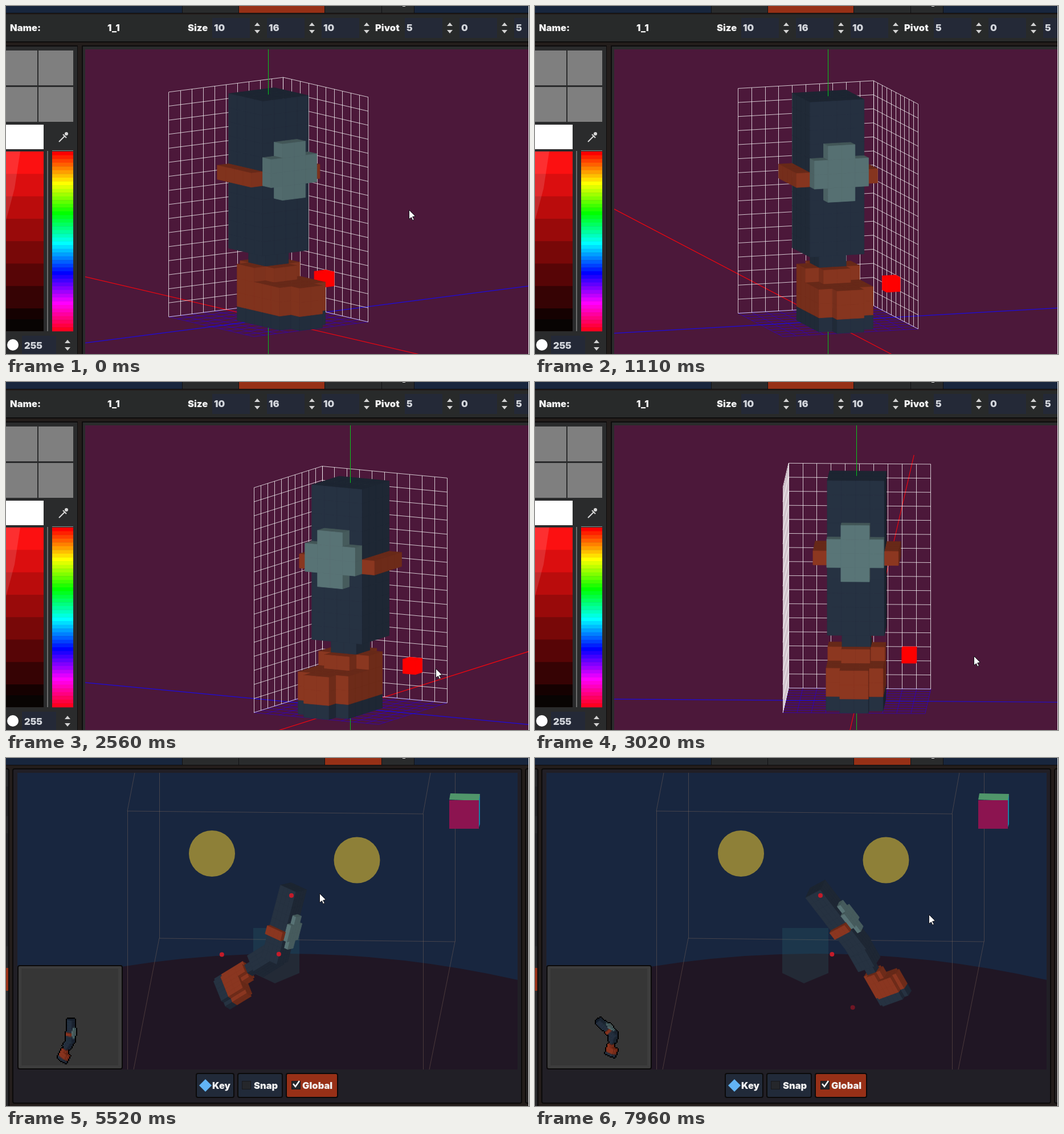
Recreate the animation shown at these times as an HTML page with a canvas. Size 918 by 610 pixels, loop 7990 ms.

```html
<!DOCTYPE html>
<html lang="en">
<head>
<meta charset="utf-8">
<title>Voxel leg</title>
<style>
  html, body { margin: 0; width: 100%; height: 100%; overflow: hidden; background: #211d1c; }
  canvas { display: block; width: 918px; height: 610px; }
</style>
</head>
<body>
<canvas id="stage" width="918" height="610"></canvas>
<script>
const LOOP = 7990, ANIMATE_TAB = 4760;
const g = document.getElementById('stage').getContext('2d');
const clamp = (v, low, high) => Math.min(high, Math.max(low, v));
const rad = degrees => degrees * Math.PI / 180;

// ---------- drawing helpers ----------
function rect(x, y, w, h, color) {
  g.fillStyle = color;
  g.fillRect(x, y, w, h);
}
function poly(c, points, color, edge) {
  c.beginPath();
  points.forEach(([x, y]) => c.lineTo(x, y));
  c.closePath();
  c.fillStyle = color;
  c.fill();
  if (edge) {
    c.strokeStyle = color;
    c.lineWidth = edge;
    c.stroke();
  }
}
// Vertical lines snap to whole pixels
function line([ax, ay], [bx, by]) {
  if (Math.abs(ax - bx) < 0.01) ax = bx = Math.floor(ax) + 0.5;
  g.moveTo(ax, ay);
  g.lineTo(bx, by);
}
function strokeLines(color, draw, width = 1) {
  g.beginPath();
  draw();
  g.strokeStyle = color;
  g.lineWidth = width;
  g.stroke();
}
function clipped(x, y, w, h, draw) {
  g.save();
  g.beginPath();
  g.rect(x, y, w, h);
  g.clip();
  draw();
  g.restore();
}
function disc(x, y, r, color) {
  g.beginPath();
  g.arc(x, y, r, 0, 7);
  g.fillStyle = color;
  g.fill();
}
function label(text, x, y, color = '#f2f2f2') {
  g.font = '900 16.5px Inter, sans-serif';
  g.fillStyle = color;
  g.fillText(text, x, y);
}
function panel(x, y, w, h, color) {
  g.beginPath();
  g.roundRect(x, y, w, h, 3);
  g.fillStyle = color;
  g.fill();
  g.strokeStyle = '#0b0a0a';
  g.lineWidth = 2;
  g.stroke();
}

// ---------- motion ----------
// Each move is [from ms, to ms, ...end values]; values rest between moves
function follow(t, start, moves) {
  return moves.reduce((now, [from, to, ...end]) => {
    const k = clamp((t - from) / (to - from), 0, 1);
    return now.map((v, i) => v + (end[i] - v) * k);
  }, start);
}
const yawAt = t => follow(t, [36.6],
  [[370, 1340, 12.6], [1550, 2300, -43.7], [2300, 3020, -2.3]])[0];
const pointerAt = t => follow(t, [707, 357], [
  [40, 1550, 752, 488], [1930, 2560, 754, 502], [2560, 3020, 770, 480],
  [3260, 3450, 834, 330], [3450, 3700, 638, 101], [3940, 4270, 601, 7],
  [5130, 5520, 550, 237], [6680, 7260, 671, 266], [7850, 7960, 691, 274]
]);
function brushCell(t) {
  if (t < 2300) return { x: 9, h: 2, z: 4 };
  const row = Math.floor((538 - pointerAt(t)[1]) / 24.6);
  return { x: t < 3020 ? 7 : 8, h: clamp(row, 2, 15), z: 9 };
}

// ---------- voxel model ----------
const NAVY = [38, 50, 66], ORANGE = [139, 55, 32], TEAL = [89, 116, 118], RED = [255, 0, 0];
const voxels = new Map();
const key = (x, h, z) => `${x},${h},${z}`;
function block([x0, x1], [h0, h1], [z0, z1], color) {
  for (let x = x0; x < x1; x++)
    for (let h = h0; h < h1; h++)
      for (let z = z0; z < z1; z++) voxels.set(key(x, h, z), { x, h, z, color });
}
const WIDE = [3, 7], SLIM = [4, 6];
block([2, 8], [10, 11], WIDE, ORANGE);
block(WIDE, [5, 16], WIDE, NAVY);
block(SLIM, [4, 5], SLIM, NAVY);
block(WIDE, [3, 4], SLIM, ORANGE);
block(SLIM, [3, 4], WIDE, ORANGE);
for (const [rows, color] of [[[0, 1], NAVY], [[1, 3], ORANGE]]) {
  block(WIDE, rows, [1, 6], color);
  block(SLIM, rows, [0, 7], color);
}
block(WIDE, [10, 12], [2, 3], TEAL);
block(SLIM, [9, 13], [2, 3], TEAL);

// Parallel projection with the model corner at (left, base)
function camera(yaw, tilt, unit, tall, left = 0, base = 0) {
  const c = Math.cos(yaw), s = Math.sin(yaw);
  const depth = (x, z) => x * s + z * c;
  return {
    c, s,
    at: (x, h, z) => [left + unit * (x * c - z * s), base - unit * tilt * depth(x, z) - tall * h],
    far: v => depth(v.x, v.z) - v.h * tilt
  };
}
const shade = (right, near) => 0.68 + 0.34 * Math.max(0, -0.18 * right + 0.95 * near);

function drawVoxels(ctx, cells, { at, far, c, s }) {
  const dir = s > 0 ? -1 : 1;
  const faces = [
    { n: [0, 1, 0], u: [1, 0, 0], v: [0, 0, 1], light: 0.74 },
    { n: [dir, 0, 0], u: [0, 1, 0], v: [0, 0, 1], light: shade(dir * c, -dir * s) },
    { n: [0, 0, -1], u: [1, 0, 0], v: [0, 1, 0], light: shade(s, c) }
  ];
  for (const cell of [...cells.values()].sort((a, b) => far(b) - far(a))) {
    const p = [cell.x, cell.h, cell.z], flat = cell.color === RED;
    for (const { n, u, v, light } of faces) {
      if (cells.has(key(...p.map((q, i) => q + n[i])))) continue;
      const o = p.map((q, i) => q + Math.max(0, n[i]));
      const corner = (a, b) => at(...o.map((q, i) => q + a * u[i] + b * v[i]));
      const rgb = cell.color.map(q => Math.round(q * (flat ? 1 : light)));
      poly(ctx, [corner(0, 0), corner(1, 0), corner(1, 1), corner(0, 1)], `rgb(${rgb})`, 0.8);
    }
  }
}

function drawModelView(t) {
  const view = camera(rad(yawAt(t)), 0.1725, 25, 24.63, 435, 579.5), { at } = view;
  rect(139, 76, 778, 534, '#4c183a');

  strokeLines('rgba(48,0,195,.75)', () => {
    for (let i = 0; i <= 10; i++) {
      line(at(i, 0, 0), at(i, 0, 10));
      line(at(0, 0, i), at(10, 0, i));
    }
  });
  strokeLines('#ee060f', () => line(at(5, 0, -95), at(5, 0, 105)), 1.2);
  strokeLines('#1c0ae0', () => line(at(-95, 0, 5), at(105, 0, 5)), 1.2);
  strokeLines('#06c01c', () => line(at(5, 0, 5), at(5, -50, 5)));

  const side = view.s > 0 ? 10 : 0;
  strokeLines('rgba(255,255,255,.75)', () => {
    for (let i = 0; i <= 10; i++) {
      line(at(i, 0, 10), at(i, 16, 10));
      line(at(side, 0, i), at(side, 16, i));
    }
    for (let h = 0; h <= 16; h++) {
      line(at(0, h, 10), at(10, h, 10));
      line(at(side, h, 0), at(side, h, 10));
    }
  });

  const brush = { ...brushCell(t), color: RED };
  drawVoxels(g, new Map(voxels).set(key(brush.x, brush.h, brush.z), brush), view);
  strokeLines('#06c81c', () => line(at(5, 16, 5), at(5, 60, 5)));
}

// ---------- interface ----------
function drawTabs(active) {
  const edges = [310, 409, 560, 660, 717];
  rect(0, 0, 918, 610, '#231d1b');
  rect(0, 0, 918, 12, '#18263d');
  for (let i = 0; i < 4; i++) {
    rect(edges[i] - 1, 0, edges[i + 1] - edges[i] + 1, 12, '#111214');
    rect(edges[i], 0, edges[i + 1] - edges[i] - 1, 12, i === active ? '#963016' : '#292b2c');
  }
  rect(696, 0, 5, 1, '#d8d8d8');
  rect(0, 12, 918, 1, '#0d0c0c');
}
function spinner(x, y) {
  for (const up of [-1, 1]) {
    const base = y + 0.5 + up * 3.5;
    poly(g, [[x - 5, base], [x, base + up * 6], [x + 5, base]], '#d2d2d2');
  }
}
function fields(x, values) {
  values.forEach((value, i) => {
    const left = x + i * 96;
    rect(left, 21, 66, 35, '#242937');
    label(value, left + 3, 44, '#d3d6dc');
    spinner(left + 79, 38);
  });
}
function drawModelPanels() {
  drawTabs(1);
  rect(0, 15, 918, 47, '#282a2a');
  rect(0, 62, 918, 2, '#0d0c0c');
  for (const [x, w] of [[-2, 128], [133, 790]]) {
    rect(x, 69, w, 541, '#0d0c0c');
    rect(x + 2, 71, w - 3, 539, '#2a2b2c');
  }
  label('Name:', 7, 44);
  label('1_1', 178, 44);
  label('Size', 319, 44);
  label('Pivot', 648, 44);
  fields(362, ['10', '16', '10']);
  fields(700, ['5', '0', '5']);

  for (const x of [-6, 57])
    for (const y of [78, 142]) rect(x, y, 61, 61, '#7f7f7f');
  rect(0, 208, 66, 43, '#fff');
  strokeLines('#d8d8d8', () => {
    line([93, 238], [103, 228]);
    line([100, 225], [106, 231]);
  }, 2);
  disc(106, 224, 3, '#d8d8d8');

  for (let i = 0; i < 8; i++) {
    const r = 252 - 33 * i;
    rect(0, 255 + i * 39.3, 66, 40, `rgb(${r},${r / 16},${r / 15})`);
  }
  rect(0, 549, 66, 21, '#080403');
  poly(g, [[0, 255], [25, 255], [15, 320], [0, 376]], 'rgba(255,255,255,.13)');
  rect(72, 254, 2, 316, '#6c6c6c');
  rect(81, 253, 37, 1, '#8a8a8a');
  for (let i = 0; i < 48; i++) rect(81, 255 + i * 6.56, 37, 7, `hsl(${i * 7.5},100%,50%)`);
  rect(28, 578, 60, 32, '#242937');
  disc(12, 594, 10, '#fff');
  label('255', 32, 601, '#d3d6dc');
  spinner(108, 594);
}
function drawPointer(x, y) {
  const arrow = [[0, 0], [0, 16], [4, 13], [6, 18], [9, 17], [6, 12], [11, 11]];
  poly(g, arrow.map(([dx, dy]) => [x + dx + 0.5, y + dy + 0.5]), '#fff');
  g.strokeStyle = '#15151c';
  g.lineWidth = 1;
  g.stroke();
}

// ---------- walking leg ----------
const KNEE = 8, THIGH_LENGTH = 105, SHIN_LENGTH = 100;
const part = test => new Map([...voxels].filter(([, v]) => test(v.h)));
const thigh = part(h => h >= KNEE - 1), shin = part(h => h < KNEE);
const sideView = camera(rad(60), 0.3, 8.5, 14.5);

// Eight steps make one stride; angles are measured forward from straight down
function poseAt(step) {
  const p = step * Math.PI / 4;
  const hip = 11.5 + 28 * Math.sin(p - 0.43) - 12 * Math.cos(2 * p);
  const bend = 39.6 + 47.5 * Math.cos(p - 0.4) + 15 * Math.sin(2 * p - 0.41);
  return { thighAngle: rad(hip), shinAngle: rad(hip - bend) };
}
function hang([x, y], angle, length) {
  return [x + length * Math.sin(angle), y + length * Math.cos(angle)];
}
function drawLeg(c, { thighAngle, shinAngle }) {
  const limb = (cells, [x, y], angle, joint) => {
    const [ox, oy] = sideView.at(5, joint, 5);
    c.save();
    c.translate(x, y);
    c.rotate(-angle);
    c.translate(-ox, -oy);
    drawVoxels(c, cells, sideView);
    c.restore();
  };
  limb(shin, hang([0, 0], thighAngle, THIGH_LENGTH), shinAngle, KNEE);
  limb(thigh, [0, 0], thighAngle, 15);
}
function drawJoints({ thighAngle, shinAngle }) {
  const knee = hang([0, 0], thighAngle, THIGH_LENGTH);
  const foot = hang(knee, shinAngle, SHIN_LENGTH);
  disc(0, 0, 4, '#c41c2a');
  disc(...knee, 4, '#c41c2a');
  disc(...foot, 4, foot[1] > 140 ? '#701624' : '#c41c2a');
}

// Low resolution preview with a black outline
const SIZE = 85;
const small = new OffscreenCanvas(SIZE, SIZE), sc = small.getContext('2d', { willReadFrequently: true });
function drawPreview(pose) {
  sc.setTransform(1, 0, 0, 1, 0, 0);
  sc.clearRect(0, 0, SIZE, SIZE);
  sc.setTransform(0.155, 0, 0, 0.155, 43.5, 47);
  drawLeg(sc, pose);
  const image = sc.getImageData(0, 0, SIZE, SIZE), px = image.data;
  const solid = px.filter((_, i) => i % 4 === 3).map(a => a > 120 ? 1 : 0);
  solid.forEach((on, i) => {
    const rim = !on && (solid[i - 1] || solid[i + 1] || solid[i - SIZE] || solid[i + SIZE]);
    if (rim) px.fill(0, i * 4, i * 4 + 3);
    px[i * 4 + 3] = on || rim ? 255 : 0;
  });
  sc.putImageData(image, 0, 0);
  g.imageSmoothingEnabled = false;
  g.drawImage(small, 27, 369, SIZE * 2, SIZE * 2);
}

function drawRoom() {
  rect(20, 26, 878, 520, '#18263f');
  g.beginPath();
  g.moveTo(20, 404);
  g.quadraticCurveTo(459, 290, 898, 389);
  g.lineTo(898, 546);
  g.lineTo(20, 546);
  g.fillStyle = '#201624';
  g.fill();
  strokeLines('rgba(150,120,100,.36)', () => {
    line([213, 93], [732, 98]);
    line([269, 316], [788, 322]);
    for (const i of [0, 1]) {
      const x = 213 + 519 * i, top = 93 + 5 * i, back = 316 + 6 * i;
      line([x, top], [x, 546]);
      line([x + 13, 26], [x, top]);
      line([x + 56, 26], [x + 56, back]);
      line([x + 56, back], [x + 11, 546]);
    }
  });
  disc(361.5, 167.5, 40.5, '#8e8038');
  disc(616, 179, 40.5, '#8e8038');
  poly(g, [[829, 74], [832, 63], [832, 116], [829, 124]], '#1583a6');
  poly(g, [[780, 62], [832, 63], [830, 75], [778, 73]], '#50966a');
  rect(778, 74, 52, 50, '#8c1450');
  poly(g, [[434, 298], [515, 298], [515, 377], [472, 395], [434, 377]], 'rgba(45,120,125,.2)');
}
function button(x, w, text, textX, color) {
  panel(x, 553, w, 42, color);
  label(text, textX, 580);
}
function drawAnimateView(t) {
  const step = Math.floor((t - ANIMATE_TAB) / 190 + 0.05);
  drawTabs(2);
  panel(-8, 19, 13, 600, '#29292b');
  rect(0, 50, 4, 52, '#222225');
  rect(0, 132, 4, 198, '#222225');
  rect(0, 368, 4, 40, '#963016');
  panel(912, 19, 20, 586, '#282526');
  panel(12, 19, 893, 586, '#211f26');

  clipped(20, 26, 878, 520, () => {
    drawRoom();
    g.translate(501, 241);
    drawLeg(g, poseAt(step + 3));
    drawJoints(poseAt(step + 4));
  });

  panel(21, 364, 183, 181, '#3d3d3d');
  rect(27, 369, 170, 170, '#363636');
  drawPreview(poseAt(Math.max(step, 1) + 2));

  button(334, 66, 'Key', 362, '#212a39');
  poly(g, [[350, 563], [361, 574], [350, 585], [339, 574]], '#62b4f5');
  button(407, 78, 'Snap', 435, '#212a39');
  button(492, 90, 'Global', 520, '#973017');
  for (const x of [414, 501]) {
    rect(x, 566, 16, 15, '#17181c');
    rect(x + 1, 567, 14, 13, '#25272b');
  }
  strokeLines('#fff', () => {
    line([504, 571], [508, 576]);
    g.lineTo(515, 566);
  }, 2.5);
}

// ---------- loop ----------
const start = performance.now();
function frame() {
  const t = (performance.now() - start) % LOOP;
  if (t < ANIMATE_TAB) {
    drawModelPanels();
    clipped(139, 76, 778, 534, () => drawModelView(t));
  } else {
    drawAnimateView(t);
  }
  if (t < 40 || t >= 1550) drawPointer(...pointerAt(t));
  rect(917, 0, 1, 610, '#f4f4f4');
  requestAnimationFrame(frame);
}
frame();
</script>
</body>
</html>
```
